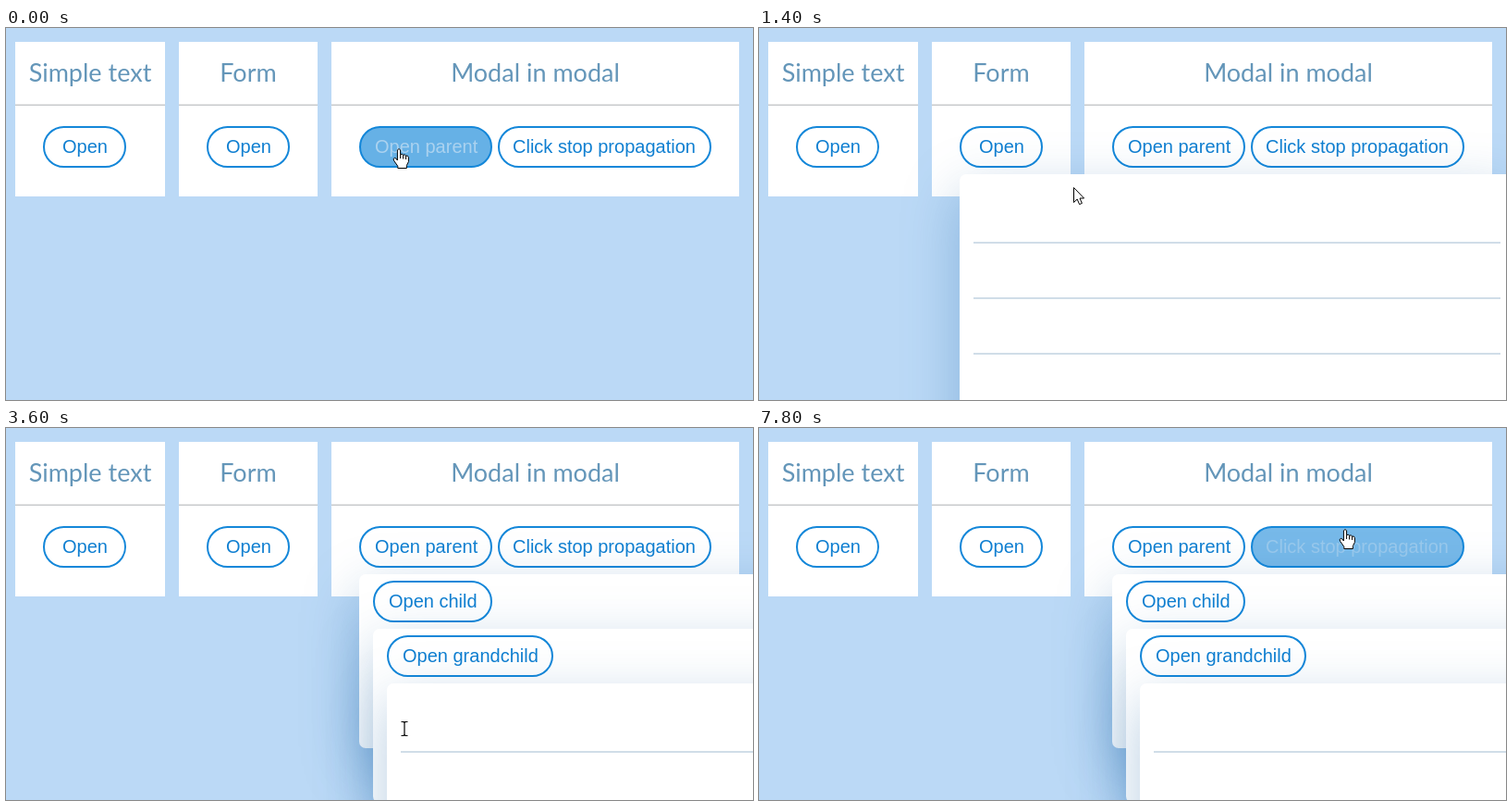
Recreate the animation shown at these times as an HTML page. Size 808 by 402 pixels, loop 8 s.

```html
<!DOCTYPE html>
<html lang="en">
<head>
<meta charset="utf-8">
<title>Modal in modal</title>
<style>
html, body { margin: 0; width: 100%; height: 100%; overflow: hidden; background: #bbd9f6; }
svg { display: block; width: 808px; height: 402px; }
.title { font: 27px Lato, "Open Sans", sans-serif; fill: #6496b9; text-anchor: middle; }
.label { font: 20px "Liberation Sans", Arial, sans-serif; }
</style>
</head>
<body>
<svg id="stage" viewBox="0 0 808 402">
  <defs>
    <filter id="shadow" x="-20%" y="-60%" width="140%" height="220%" color-interpolation-filters="sRGB">
      <feDropShadow dx="0" dy="20" stdDeviation="30" flood-color="#005096" flood-opacity=".28"/>
    </filter>
  </defs>
</svg>
<script>
const STEP = 200, STEPS = 40;
const stage = document.getElementById('stage');

const card = (x, w, title) => `
  <rect x="${x}" y="15" width="${w}" height="167" fill="#fff"/>
  <rect x="${x}" y="82.5" width="${w}" height="1.5" fill="#c8cacc"/>
  <text class="title" x="${x + w / 2}" y="58">${title}</text>`;

const button = (id, x, y, w, label, pad = 17) => `
  <g id="${id}">
    <rect x="${x + 1}" y="${y + 1}" width="${w - 2}" height="43" rx="21.5" fill="#fff" stroke="#1487d9" stroke-width="2"/>
    <text class="label" x="${x + pad}" y="${y + 29}" fill="#0f7fd1">${label}</text>
  </g>`;

const modal = (id, x, y, h, lines, inner = '') => `
  <g id="${id}">
    <rect x="${x}" y="${y}" width="600" height="${h}" rx="7" fill="#fff" filter="url(#shadow)"/>
    ${lines.map(d => `<rect x="${x + 15}" y="${y + d}" width="570" height="2" fill="#d0dde8"/>`).join('')}
    ${inner}
  </g>`;

stage.insertAdjacentHTML('beforeend',
  card(10, 162, 'Simple text') + card(187, 150, 'Form') + card(352, 441, 'Modal in modal') +
  button('simple', 40, 106, 90, 'Open', 21) +
  button('form', 217, 106, 90, 'Open', 21) +
  button('parent', 382, 106, 144, 'Open parent') +
  button('stop', 532, 106, 231, 'Click stop propagation', 16) +
  modal('formModal', 217, 158, 420, [73, 133, 193, 253]) +
  modal('parentModal', 382, 158, 188, [111, 171], button('child', 397, 165, 129, 'Open child')) +
  modal('childModal', 397, 217, 188, [111, 171], button('grandchild', 412, 224, 180, 'Open grandchild')) +
  modal('grandchildModal', 412, 276, 300, [73, 133]) + `
  <g id="pointer" stroke="#000" stroke-linejoin="round" fill="#fff">
    <path id="arrow" d="M.5 .5V16.5L4.2 13L6.6 18.6L9.4 17.4L7 12H11.6Z"/>
    <g id="hand">
      <path d="M-1.6 1.8Q0 -.6 1.6 1.8V6.6Q3.4 5.6 4.6 7.2Q6.4 6.3 7.6 8Q9.7 7.4 10.4 9.6V14.5L8.4 18.5V21.5H-1.2V19.3L-5.5 13.2Q-6.6 10.8 -4.6 10.4Q-3 10.4 -1.6 13Z"/>
      <path d="M1.6 6.6V11M4.6 7.2V11.5M7.6 8V12" fill="none"/>
    </g>
    <path id="beam" d="M-3.5 -7.5H-1L0 -6.5L1 -7.5H3.5M0 -6.5V6.5M-3.5 7.5H-1L0 6.5L1 7.5H3.5" fill="none" stroke-width="1.2"/>
  </g>`);

// Fill level of each button while its hover state fades in or out
const hover = {
  parent: { 0: .65, 1: 1, 2: .26, 8: .65, 9: 1, 10: 1, 11: .26 },
  form: { 3: .65, 4: 1, 5: 1, 6: .26 },
  child: { 11: .65, 12: 1, 13: .26 },
  grandchild: { 13: .65, 14: 1, 15: 1, 16: .26 },
  stop: { 39: .58 }
};

// Steps during which each modal is open: [first, end)
const open = {
  formModal: [[4, 9]],
  parentModal: [[1, 4], [9, STEPS]],
  childModal: [[12, STEPS]],
  grandchildModal: [[15, STEPS]]
};

// Pointer stops: step, x, y, shape
const path = [
  [0, 425, 130, 'hand'], [2, 235, 221, 'arrow'], [3, 262, 128, 'hand'],
  [5, 250, 188, 'beam'], [7, 340, 172, 'arrow'], [8, 425, 130, 'hand'],
  [10, 477, 185, 'hand'], [13, 483, 238, 'hand'], [14, 486, 246, 'hand'],
  [16, 460, 290, 'beam'], [18, 431, 325, 'beam'], [19, 560, 300, 'beam'],
  [20, 687, 262, 'arrow'], [21, 678, 245, 'arrow'], [24, 625, 192, 'arrow'],
  [25, 640, 188, 'arrow'], [26, 660, 200, 'arrow'], [27, 676, 225, 'arrow'],
  [28, 665, 240, 'arrow'], [29, 650, 220, 'arrow'], [30, 620, 190, 'arrow'],
  [31, 585, 170, 'arrow'], [32, 568, 200, 'arrow'], [33, 610, 235, 'arrow'],
  [34, 681, 215, 'arrow'], [35, 650, 244, 'arrow'], [36, 642, 205, 'arrow'],
  [37, 636, 170, 'arrow'], [38, 634, 153, 'arrow'], [39, 634, 109, 'hand']
];

const el = id => document.getElementById(id);
const show = (id, on) => el(id).setAttribute('visibility', on ? 'visible' : 'hidden');
const mix = (a, b, k) => `rgb(${a.map((v, i) => Math.round(v + (b[i] - v) * k))})`;
const WHITE = [255, 255, 255], BLUE = [20, 135, 217], INK = [15, 127, 209];

function render(ms) {
  const step = Math.floor(ms / STEP) % STEPS;
  for (const id in hover) {
    const level = hover[id][step] || 0;
    const [box, text] = el(id).children;
    box.setAttribute('fill', mix(WHITE, BLUE, level));
    text.setAttribute('fill', mix(INK, WHITE, level));
  }
  for (const id in open) {
    el(id).style.display = open[id].some(([a, b]) => step >= a && step < b) ? '' : 'none';
  }
  const [, x, y, shape] = path.filter(p => p[0] <= step).pop();
  el('pointer').setAttribute('transform', `translate(${x} ${y})`);
  for (const id of ['arrow', 'hand', 'beam']) show(id, id === shape);
}

const start = performance.now();
function tick() {
  render(performance.now() - start);
  requestAnimationFrame(tick);
}
tick();
</script>
</body>
</html>
```
